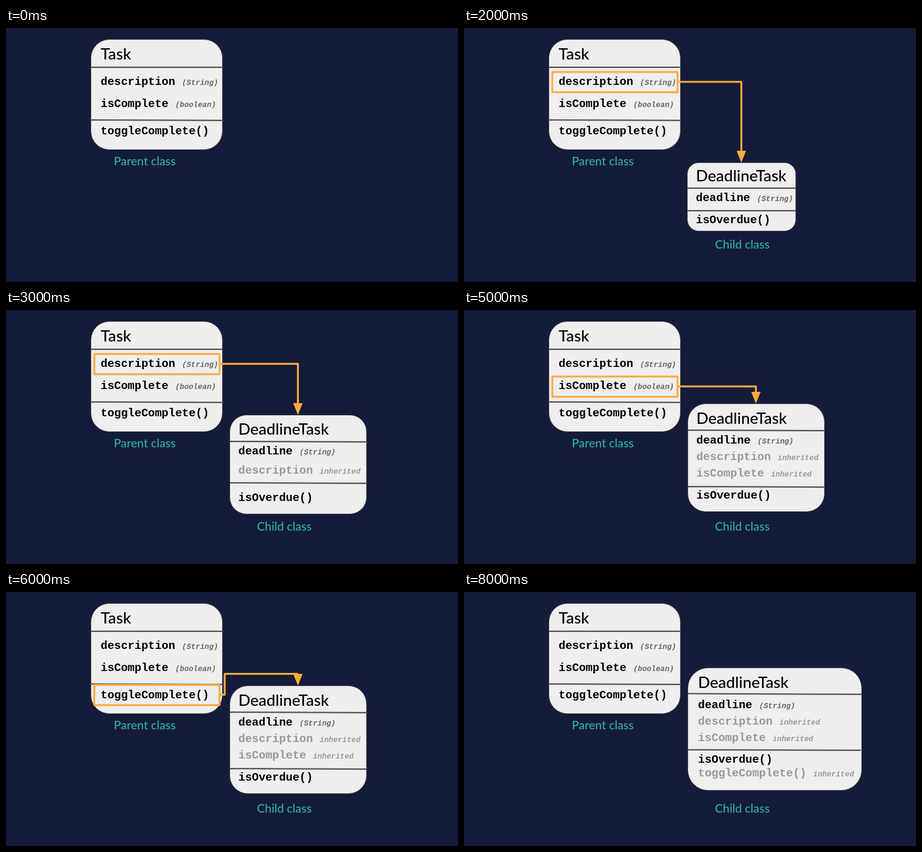
Animation, 960 px wide and 540 px high, one loop 9 s. Source, as an HTML page:

```html
<!DOCTYPE html>
<html lang="en">
<head>
<meta charset="utf-8">
<title>Class inheritance</title>
<style>
  html, body { margin: 0; width: 100%; height: 100%; overflow: hidden; background: #151c39; }
  svg { display: block; }
  text { white-space: pre; }
  .card { fill: #eee; stroke: #595959; }
  .rule { stroke: #595959; stroke-width: 3; }
  .title { font: 500 33.6px Nunito, Lato, sans-serif; }
  .label { font: 500 25.2px Nunito, Lato, sans-serif; fill: #2bb0a2; }
  .code { font: bold 24px "Courier New", "Liberation Mono", monospace; }
  .note { font-size: 16px; font-style: italic; fill: #666; }
  .inherited, .inherited .note { fill: #999; }
  .link { fill: none; stroke: #ffab40; stroke-width: 4; stroke-linejoin: round; }
  .head { fill: #ffab40; }
</style>
</head>
<body>
<svg id="stage" width="960" height="540" viewBox="0 0 960 540"></svg>
<script>
const stage = document.getElementById('stage');

const text = (cls, x, y, s) => `<text class="${cls}" x="${x}" y="${y}">${s}</text>`;

// Member rows are [baseline, name, note].
function card({ x, y, w, h, r, tx, title, rules, rows }) {
  const lines = rules.map(([x1, y1, x2, y2]) =>
    `<line class="rule" x1="${x1}" y1="${y1}" x2="${x2}" y2="${y2}"/>`).join('');
  const members = rows.map(([by, name, note]) => text(
    note === 'inherited' ? 'code inherited' : 'code', tx, by,
    name + (note ? ` <tspan class="note">${note}</tspan>` : ''))).join('');
  return `<rect class="card" x="${x}" y="${y}" width="${w}" height="${h}" rx="${r}"/>` +
    lines + text('title', tx, title[0], title[1]) + members;
}

const parent = card({
  x: 180.5, y: 24.5, w: 279, h: 234, r: 39, tx: 201, title: [67, 'Task'],
  rules: [[181, 83.5, 459, 83.5], [179, 195.5, 461, 196.5]],
  rows: [[121, 'description', '(String)'], [168, 'isComplete', '(boolean)'], [226, 'toggleComplete()']]
}) + text('label', 229, 291.5, 'Parent class');

const inherited = 'inherited';
const children = [
  {
    x: 474.5, y: 286.5, w: 230, h: 145, r: 24, tx: 492.5, title: [326, 'DeadlineTask'],
    rules: [[475, 340.5, 704, 340.5], [475, 388.5, 705, 388.5]],
    rows: [[368, 'deadline', '(String)'], [415, 'isOverdue()']]
  },
  {
    x: 475.5, y: 223.5, w: 290, h: 210, r: 35, tx: 493.5, title: [265, 'DeadlineTask'],
    rules: [[476, 279.5, 765, 280.5], [476, 367.5, 765, 368.5]],
    rows: [[307, 'deadline', '(String)'], [348, 'description', inherited], [406, 'isOverdue()']]
  },
  {
    x: 475.5, y: 199.5, w: 290, h: 229, r: 38, tx: 493.5, title: [242, 'DeadlineTask'],
    rules: [[476, 255.5, 765, 256.5], [476, 375.5, 765, 376.5]],
    rows: [[284, 'deadline', '(String)'], [319, 'description', inherited],
      [354, 'isComplete', inherited], [401, 'isOverdue()']]
  },
  {
    x: 475.5, y: 161.5, w: 369, h: 260, r: 43, tx: 497, title: [204, 'DeadlineTask'],
    rules: [[476, 216, 844, 217.5], [476, 335.5, 843, 336.5]],
    rows: [[247, 'deadline', '(String)'], [282, 'description', inherited],
      [317, 'isComplete', inherited], [363, 'isOverdue()'], [392, 'toggleComplete()', inherited]]
  }
];

// Highlights one parent member and points from it to the top of the child.
function link(top, { x, y, w }) {
  const mid = top + 21, tipX = x + w / 2 - .5, tipY = y - .5, neck = tipY - 25;
  const turn = mid < y ? `H${tipX}V${neck + 2}` : `H464.5V${neck}H${tipX}`;
  return `<rect class="link" x="187.5" y="${top}" width="266" height="43"/>` +
    `<path class="link" d="M454 ${mid}${turn}"/>` +
    `<path class="head" d="M${tipX - 10} ${neck}h20L${tipX} ${tipY}z"/>`;
}

const DESCRIPTION = 93.5, COMPLETE = 141.5, TOGGLE = 197.5;
// One step per second: [child index, highlighted member].
const steps = [[], [0], [0, DESCRIPTION], [1, DESCRIPTION], [1, COMPLETE],
  [2, COMPLETE], [2, TOGGLE], [3, TOGGLE], [3]];

const scenes = steps.map(([i, top]) => {
  const child = children[i];
  return parent +
    (child ? card(child) + text('label', 533, 468.5, 'Child class') : '') +
    (top ? link(top, child) : '');
});

let shown = -1;
function draw() {
  const step = Math.floor(performance.now() % 9000 / 1000);
  if (step !== shown) stage.innerHTML = scenes[shown = step];
  requestAnimationFrame(draw);
}
draw();
</script>
</body>
</html>
```
